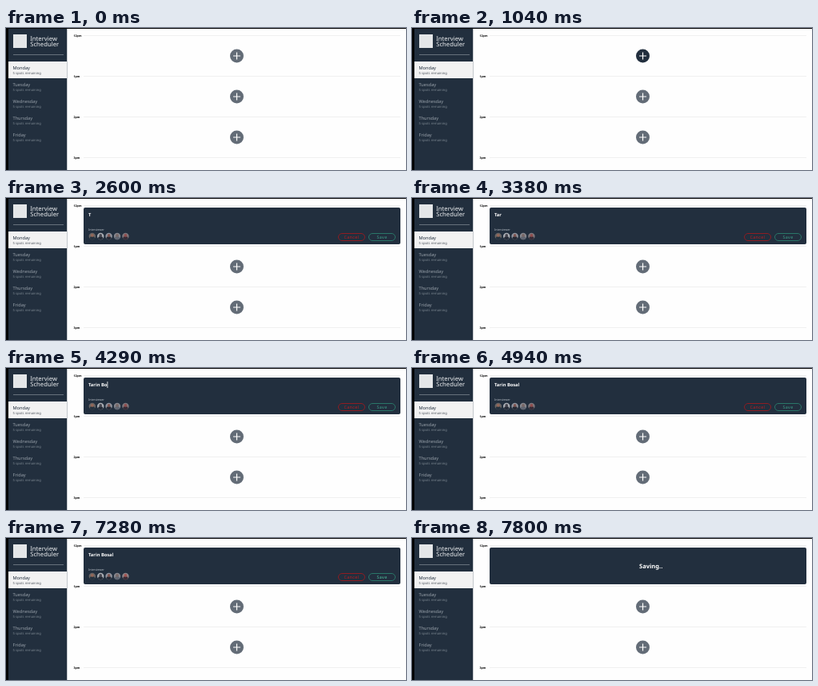
Animation, 500 px wide and 178 px high, one loop 8 s. Source, as an HTML page:

```html
<!DOCTYPE html>
<html lang="en">
<head>
<meta charset="utf-8">
<title>Interview Scheduler</title>
<style>
  html, body { margin: 0; width: 100%; height: 100%; overflow: hidden; background: #fefefe; }
  svg { display: block; width: 100%; height: 100%; }
  text { font-family: "Noto Sans", sans-serif; text-rendering: geometricPrecision; white-space: pre; }
  .light { font-weight: 300; }
  .bold { font-weight: 700; }
  .middle { text-anchor: middle; }
  .pill { font-size: 5.3px; letter-spacing: .4px; text-anchor: middle; }
</style>
</head>
<body>
<svg viewBox="0 0 500 178">
  <rect width="500" height="178" fill="#fefefe"/>
  <rect width="76" height="178" fill="#222f3e"/>
  <rect x="76" width="1" height="178" fill="#c4c8cc"/>
  <rect width="3" height="178" fill="#030405"/>
  <rect width="500" height="1" fill="#030405"/>
  <rect x="9" y="8" width="17" height="17" fill="#e4e6e8"/>
  <g class="light" fill="#eef0f2" font-size="7.7">
    <text x="30.2" y="15.7">Interview</text>
    <text x="30.2" y="23.4">Scheduler</text>
  </g>
  <path d="M9 33.5H72" stroke="#66717c"/>
  <g id="days"></g>
  <g id="hours"></g>
  <g id="slots"></g>
  <g id="card">
    <rect x="97" y="12" width="396" height="46" rx="2" fill="#222f3e"/>
    <g id="form">
      <text id="hint" x="103" y="23.2" font-size="5.77" fill="#727c86">Enter Student Name</text>
      <text id="student" class="bold" x="103" y="23.2" font-size="5.72" fill="#fff"></text>
      <rect id="caret" y="17" width=".8" height="8" fill="#fff"/>
      <text x="103" y="41" font-size="3.7" fill="#b4bbc2">Interviewer</text>
      <g id="avatars"></g>
      <g fill="none">
        <rect x="415.5" y="44.5" width="33" height="9" rx="4.5" stroke="#8f1c22"/>
        <rect x="453.5" y="44.5" width="33" height="9" rx="4.5" stroke="#2a7668"/>
      </g>
      <text class="pill" x="431.9" y="50.7" fill="#c01c20">Cancel</text>
      <text class="pill" id="save" x="470" y="50.7" fill="#3fa08a">Save</text>
    </g>
    <text id="saving" class="bold middle" x="298.7" y="37.7" font-size="7.5" fill="#fff">Saving..</text>
  </g>
</svg>
<script>
const LOOP = 8000;
const NAME = "Tarin Bosal";
// Time at which each character of the name is typed
const KEYS = [2600, 2990, 3380, 3510, 3640, 3900, 4160, 4290, 4420, 4550, 4940];
const $ = id => document.getElementById(id);
const show = (el, on) => el.setAttribute("visibility", on ? "inherit" : "hidden");

$("days").innerHTML = ["Monday", "Tuesday", "Wednesday", "Thursday", "Friday"].map((day, i) => {
  const y = 42 + i * 21, active = i === 0;
  return `${active ? `<rect x="3" y="${y}" width="73" height="21" fill="#f2f2f2"/>` : ""}
    <text x="8.5" y="${y + 10}" font-size="5.63" fill="${active ? "#222f3e" : "#98a1aa"}">${day}</text>
    <text x="8.5" y="${y + 15.6}" font-size="4.2" fill="${active ? "#50575f" : "#7c8791"}">5 spots remaining</text>`;
}).join("");

$("hours").innerHTML = ["12pm", "1pm", "2pm", "3pm"].map((hour, i) => {
  const y = 9.5 + i * 51;
  return `<text class="bold" x="84.5" y="${y + 1.6}" font-size="3.6">${hour}</text>
    <path d="M97 ${y}H493" stroke="#f0f0f0"/>`;
}).join("");

$("slots").innerHTML = [35, 86, 137].map(y =>
  `<g transform="translate(288.5 ${y})" opacity=".7">
    <circle r="8.5" fill="#222f3e"/>
    <path d="M-4.5 0H4.5M0 -4.5V4.5" stroke="#fff" stroke-width="1.2"/>
  </g>`).join("");

// Backdrop, clothing and head tones of each plain silhouette
const people = [
  ["#77706c", "#26333f", "#a8705c"],
  ["#c4c6ca", "#262b36", "#4a4850"],
  ["#a5a7b0", "#262833", "#8d5a52"],
  ["#98979d", "#6b707c", "#85706c"],
  ["#8d8488", "#3a2c36", "#a4524f"]
];
$("avatars").innerHTML = people.map(([back, body, head], i) =>
  `<g transform="translate(${107.8 + i * 10.4} 48)" opacity=".85">
    <circle r="4.2" fill="${back}"/>
    <path d="M-3.4 2.5A3.5 3.2 0 0 1 3.4 2.5A4.2 4.2 0 0 1 -3.4 2.5Z" fill="${body}"/>
    <circle cy="-1.1" r="1.9" fill="${head}"/>
  </g>`).join("");

const firstSlot = $("slots").firstElementChild;
const lastAvatar = $("avatars").lastElementChild;
let typedBefore = -1;

function draw(t) {
  firstSlot.setAttribute("opacity", t < 910 ? .7 : t < 1040 ? .85 : 1);
  show(firstSlot, t < 1170);
  show($("card"), t >= 1170);

  const typed = KEYS.filter(k => t >= k).length;
  if (typed !== typedBefore) {
    $("student").textContent = NAME.slice(0, typed);
    $("caret").setAttribute("x", 103.2 + $("student").getComputedTextLength());
    typedBefore = typed;
  }
  show($("hint"), typed === 0);
  show($("caret"), t >= 4160 && t < 4420);

  lastAvatar.setAttribute("opacity", t < 5980 ? .85 : 1);
  $("save").setAttribute("fill", t < 7280 ? "#3fa08a" : "#4fc3a0");
  show($("form"), t < 7800);
  show($("saving"), t >= 7800);
}

function tick() {
  draw(performance.now() % LOOP);
  requestAnimationFrame(tick);
}
tick();
</script>
</body>
</html>
```
